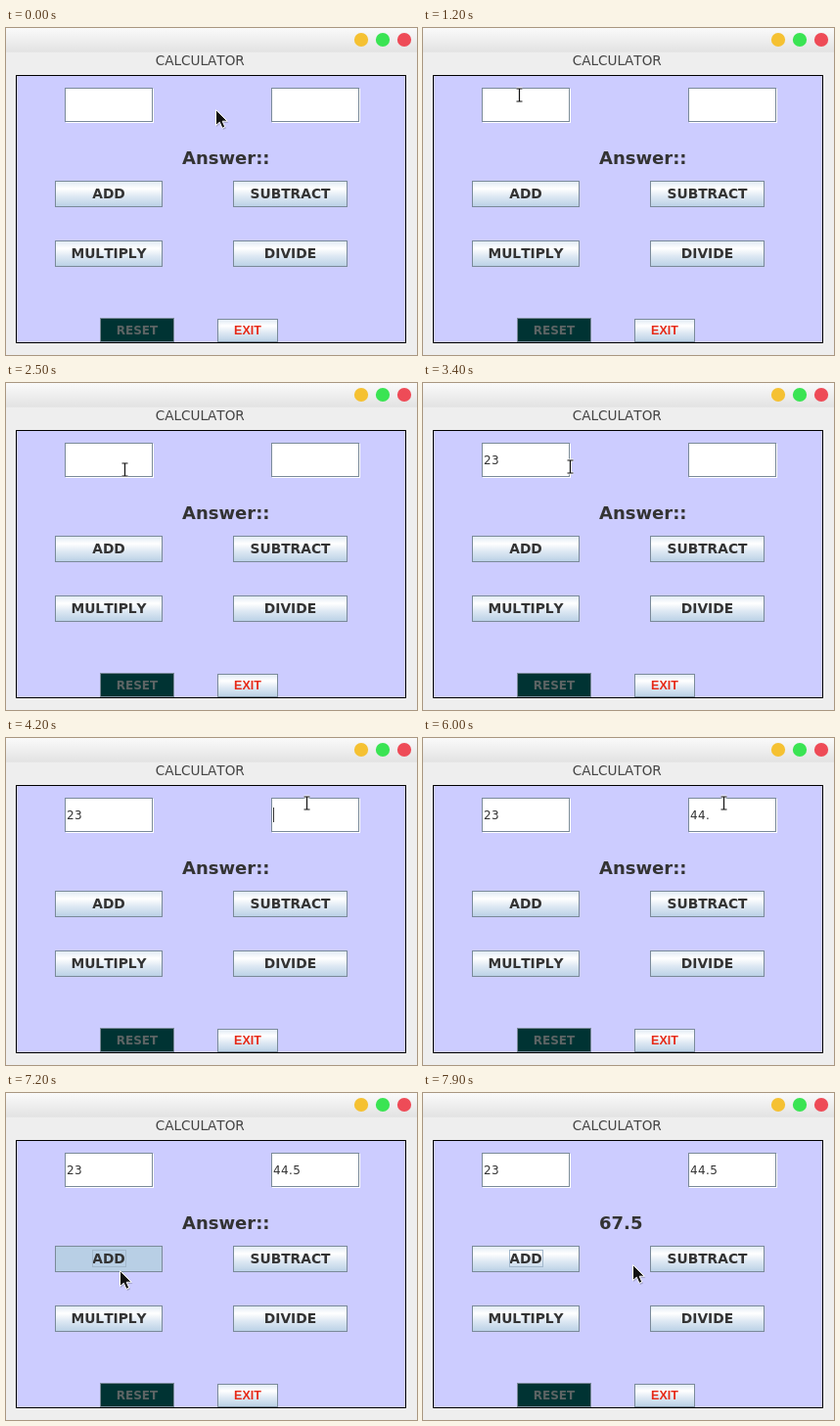
Write an HTML page that moves like this. It is 420 px wide and 334 px high and loops after 8000 ms.

```html
<!DOCTYPE html>
<html lang="en">
<head>
<meta charset="utf-8">
<title>Calculator</title>
<style>
  html, body { margin: 0; width: 100%; height: 100%; overflow: hidden; background: #eee; }
  svg { display: block; width: 420px; height: 334px; }
  text { font-family: "DejaVu Sans", sans-serif; font-kerning: none; fill: #333; white-space: pre; }
  .label { font-size: 13.8px; font-weight: bold; text-anchor: middle; }
  .entry { font-size: 12px; letter-spacing: .36px; }
  .line { fill: none; stroke: #7a8a99; }
</style>
</head>
<body>
<svg id="stage" viewBox="0 0 420 334" xmlns="http://www.w3.org/2000/svg">
  <defs>
    <linearGradient id="bar" x2="0" y2="1">
      <stop stop-color="#fafafa"/><stop offset="1" stop-color="#e3e3e3"/>
    </linearGradient>
    <linearGradient id="face" x2="0" y2="1">
      <stop stop-color="#dde8f3"/><stop offset=".3" stop-color="#fff"/>
      <stop offset=".6" stop-color="#dde8f3"/><stop offset="1" stop-color="#b8cfe5"/>
    </linearGradient>
  </defs>
  <rect width="420" height="334" fill="#eee"/>
  <rect width="420" height="24" fill="url(#bar)"/>
  <rect y="24" width="420" height="1" fill="#e6e6e6"/>
  <circle cx="363" cy="12" r="7.1" fill="#f5c132"/>
  <circle cx="385" cy="12" r="7.1" fill="#3ae453"/>
  <circle cx="407" cy="12" r="7.1" fill="#ee4b57"/>
  <text x="152.700" y="38" font-size="13.6" style="fill:#444">CALCULATOR</text>
  <rect x="10.5" y="48.5" width="398" height="273" fill="#ccf" stroke="#000"/>
  <g id="panel"></g>
  <text id="answer" x="180" y="139" font-size="18" font-weight="bold"></text>
  <rect id="caret" y="71" width="1" height="15" fill="#333"/>
  <g id="arrow">
    <path d="M1 2V18L5 15L8 21L11 19.500L8.500 14H13.500Z" fill="#000" opacity=".18"/>
    <path d="M.5 .5V16.500L4.300 13.200L7 19.300L9.800 18L7.200 12.200H12.200Z" fill="#111" stroke="#fff"/>
  </g>
  <g id="beam" fill="none">
    <path d="M-2.500 -6H3.500M-2.500 7H3.500M.5 -6V7" stroke="#fff" stroke-width="3" opacity=".9"/>
    <path d="M-2.500 -6H3.500M-2.500 7H3.500M.5 -6V7" stroke="#111" stroke-width="1.200"/>
  </g>
</svg>
<script>
const LOOP = 8000, STEP = 100;
const $ = id => document.getElementById(id);
const panel = $('panel');

function add(tag, attrs, text = '') {
  const el = document.createElementNS('http://www.w3.org/2000/svg', tag);
  for (const k in attrs) el.setAttribute(k, attrs[k]);
  el.textContent = text;
  panel.append(el);
  return el;
}

const frame = (x, y, width, height, attrs) =>
  add('rect', { x: x + .5, y: y + .5, width: width - 1, height: height - 1, ...attrs });

function field(x) {
  add('rect', { x, y: 61, width: 90, height: 35, fill: '#fff' });
  frame(x + 1, 62, 90, 35, { fill: 'none', stroke: '#fff' });
  frame(x, 61, 90, 35, { class: 'line' });
  return add('text', { x: x + 2, y: 83, class: 'entry' });
}

function button(x, y, w, h, text, base, style = '', fill = 'url(#face)') {
  const face = add('rect', { x, y, width: w, height: h, fill });
  const edge = frame(x, y, w, h, { class: 'line' });
  add('text', { x: x + w / 2, y: base, class: 'label', style }, text);
  return { face, edge };
}

const first = field(60), second = field(271);
const sum = button(50, 156, 110, 27, 'ADD', 174);
button(232, 156, 117, 27, 'SUBTRACT', 174);
button(50, 217, 110, 27, 'MULTIPLY', 235);
button(232, 217, 117, 27, 'DIVIDE', 235);
button(96, 296, 76, 25, 'RESET', 313, 'font-size:12px;fill:#5c6464', '#033');
button(216, 297, 62, 24, 'EXIT', 313,
  'font:bold 12.5px "Liberation Sans",Arial,sans-serif;fill:#e62a18');
const hoverOuter = frame(50, 156, 110, 27, { fill: 'none', stroke: '#b8cfe5' });
const hoverInner = frame(52, 158, 106, 23, { fill: 'none', stroke: '#b8cfe5' });
const focus = frame(88, 160, 35, 18, { fill: 'none', stroke: '#a3b8cc' });

// time, x, y
const path = [
  [0, 214, 83], [700, 90, 75], [800, 90, 75], [1200, 98, 68], [1700, 106, 74],
  [1900, 106, 74], [2500, 121, 88], [3300, 121, 88], [3700, 307, 66],
  [6300, 307, 66], [6800, 116, 181], [7300, 116, 181], [7900, 214, 175]
];

function pointer(t) {
  let i = 1;
  while (i < path.length - 1 && t > path[i][0]) i++;
  const [t0, x0, y0] = path[i - 1], [t1, x1, y1] = path[i];
  const u = Math.min(1, (t - t0) / (t1 - t0)), k = u * u * (3 - 2 * u);
  return [Math.round(x0 + (x1 - x0) * k), Math.round(y0 + (y1 - y0) * k)];
}

// latest value whose start time has passed
const latest = (list, t) => list.reduce((v, [at, next]) => t >= at ? next : v, '');
const typedA = [[2900, '2'], [3000, '23']];
const typedB = [[5200, '4'], [5300, '44'], [5500, '44.'], [6300, '44.5']];
const caretOn = [[2000, 2500], [2900, 3400], [3900, 4600], [5000, 6000], [6300, 6800]];

const within = (v, a, b) => v >= a && v < b;
const show = (el, on) => el.setAttribute('visibility', on ? 'visible' : 'hidden');
const place = (el, x, y) => el.setAttribute('transform', `translate(${x} ${y})`);
const advance = s => [...s].reduce((w, c) => w + (c === '.' ? 4 : 8), 0);

function draw(now) {
  const t = Math.floor(now % LOOP / STEP) * STEP;
  const a = latest(typedA, t), b = latest(typedB, t);
  first.textContent = a;
  second.textContent = b;
  $('answer').textContent = t >= 7300 ? '67.5' : 'Answer::';

  $('caret').setAttribute('x', t < 3900 ? 62 + advance(a) : 273 + advance(b));
  show($('caret'), caretOn.some(([on, off]) => within(t, on, off)));

  const [x, y] = pointer(t);
  const inField = within(y, 61, 97) && (within(x, 60, 151) || within(x, 271, 362));
  place($('arrow'), x, y);
  place($('beam'), x, y);
  show($('arrow'), !inField);
  show($('beam'), inField);

  const pressed = t === 7200;
  const hover = !pressed && within(x, 50, 160) && within(y, 156, 183);
  const inset = hover ? 1 : 0;
  sum.face.setAttribute('fill', pressed ? '#b8cfe5' : 'url(#face)');
  sum.edge.setAttribute('x', 50.5 + inset);
  sum.edge.setAttribute('y', 156.5 + inset);
  sum.edge.setAttribute('width', 109 - 2 * inset);
  sum.edge.setAttribute('height', 26 - 2 * inset);
  show(hoverOuter, hover);
  show(hoverInner, hover);
  show(focus, t >= 7200);
}

const start = performance.now();
function tick() {
  draw(performance.now() - start);
  requestAnimationFrame(tick);
}
tick();
</script>
</body>
</html>
```
